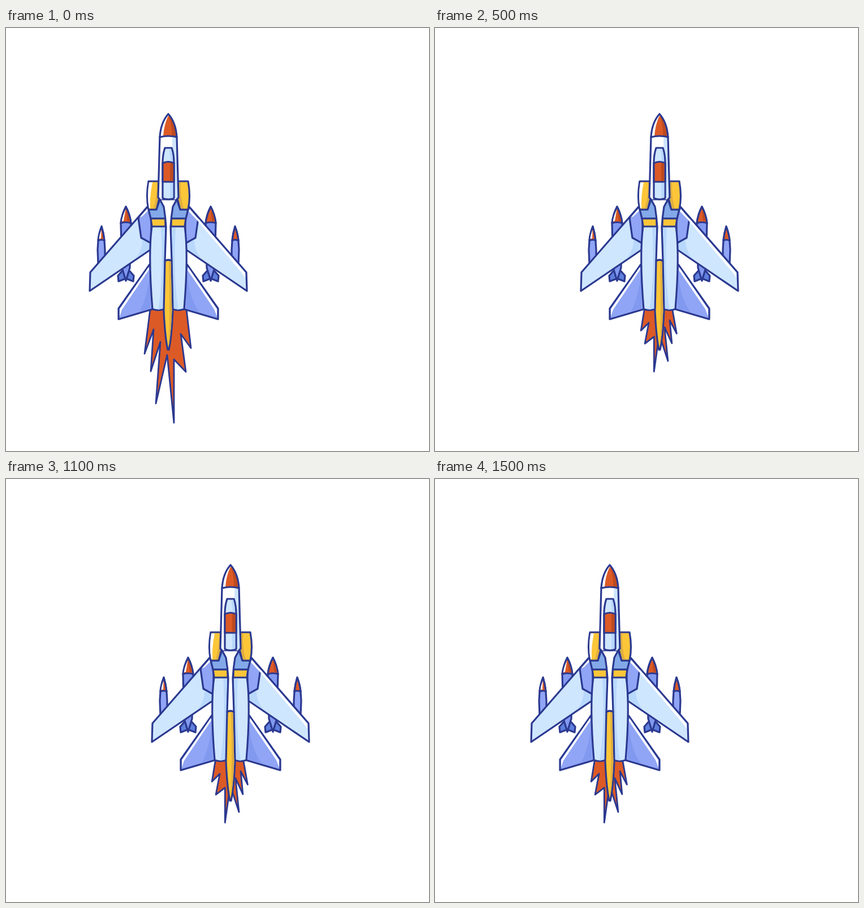
Recreate the animation shown at these times as an HTML page. Size 748 px wide and 748 px high, loop 1.6 s.

```html
<!DOCTYPE html>
<html lang="en">
<head>
<meta charset="utf-8">
<title>Jet</title>
<style>
  html, body { margin: 0; width: 100%; height: 100%; overflow: hidden; background: #fff; }
  svg { display: block; width: 100vw; height: 100vh; }
  .line { stroke: #2b3990; stroke-width: 3.2; stroke-linejoin: round; stroke-linecap: round; }
  .none { fill: none; }
  .white { fill: #fff; }
  .sky { fill: #cfe6ff; }
  .skyDark { fill: #b9d8fd; }
  .steel { fill: #83a9e9; }
  .peri { fill: #90a5f5; }
  .periDark { fill: #8299f0; }
  .navy { fill: #5f7fdc; }
  .red { fill: #dc5a26; }
  .redDark { fill: #bd4a20; }
  .gold { fill: #fdc639; }
  .goldDark { fill: #dfae42; }
  #flame path { vector-effect: non-scaling-stroke; stroke-width: 2.8; }
</style>
</head>
<body>
<svg viewBox="0 0 748 748">
  <defs>
    <g id="missiles" class="line">
      <path class="peri" d="M-118 351Q-123 364-124 376L-125 392-124 418-112 406V392L-113 376Q-114 364-118 351Z"/>
      <path class="red" d="M-118 351Q-123 364-124 376Q-118 373-113 376Q-114 364-118 351Z"/>
      <path class="navy" d="M-82 430L-89 438-88 448-75 443-62 448-61 438-68 430Z"/>
      <path class="periDark" d="M-75 316Q-82 329-84 345L-82 424-75 447-68 424-66 345Q-68 329-75 316Z"/>
      <path class="red" d="M-75 316Q-82 329-84 345Q-75 342-66 345Q-68 329-75 316Z"/>
    </g>
    <g id="wing" class="line">
      <path class="sky" d="M-37 316L-138 432-139 465-30 391V318Z"/>
      <path class="peri" d="M-37 317L-53 336-48 371-30 381V320Z"/>
      <path class="peri" d="M-33 418L-88 496-88 515-27 497V418Z"/>
    </g>
    <g id="hull" class="line">
      <path class="sky" d="M-29 350Q-36 400-28 497Q-18 501-8 497L-4 350Z"/>
      <path class="steel" d="M-35 321H-21L-15 303-6 318-5 337H-31Z"/>
      <path class="gold" d="M-31 337H-5V351H-29Z"/>
      <path class="gold" d="M-35 271H-17V303L-21 321H-35Q-40 298-35 271Z"/>
    </g>
  </defs>

  <g id="jet">
    <use href="#missiles"/>
    <use href="#missiles" transform="scale(-1 1)"/>
    <path class="white" d="M-118.500 357Q-122 366-122.400 373L-119 372ZM-75.500 321Q-81 332-82.200 342L-79 341Z"/>
    <path class="redDark" d="M75.500 321Q81 332 82.200 342L77 341ZM-75 321Q-69 332-67.800 342L-72 341Z"/>

    <g id="flame">
      <path class="line red" d="M-32 0L-42 79-26 36-31 110-14 58-22 167-2 81 10 201 10 89 31 111 22 44 40 69 32 0Z"/>
    </g>

    <use href="#wing"/>
    <use href="#wing" transform="scale(-1 1)"/>
    <path class="skyDark" d="M-46 374L-32 382V390L-58 407Q-46 394-46 374ZM46 374L32 382V390L58 407Q46 394 46 374Z"/>
    <path class="periDark" d="M-32 424V496L-50 501Q-35 470-32 424ZM32 424V496L55 503Q35 475 32 424Z"/>
    <path class="white" d="M-37 319L-51 335-46 333-34 321ZM38 320L50 334 53 337 136 433V442L130 433 51 340 36 324Z"/>
    <path class="white" d="M-35 423L-86 497V510L-82 498-34 427ZM35 423L86 497V510L81 497 34 428Z"/>

    <use href="#hull"/>
    <use href="#hull" transform="scale(-1 1)"/>
    <path class="skyDark" d="M-13 353H-6L-9 496-18 498Q-8 440-13 353ZM13 353H6L9 496 18 498Q8 440 13 353Z"/>
    <path class="white" d="M-34 273H-28Q-33 297-32 318L-34 319Q-38 297-34 273Z"/>
    <path class="goldDark" d="M-20 273H-18V303L-22 319H-26Q-20 300-20 273ZM19 273H22Q21 300 27 319H22L18 303Z"/>

    <path class="line white" d="M-15 303L-8 316Q-5 334-4 352L-6 412H6L4 352Q5 334 8 316L15 303Z"/>
    <path class="line gold" d="M-6 412Q0 408 6 412L8 500Q6 545 1 569H-1Q-6 545-8 500Z"/>
    <path class="goldDark" d="M1 412L4.400 413 6.400 500Q5 540 1 560Q3 480 1 412Z"/>

    <path class="white" d="M-15 192H15L18 303H-18Z"/>
    <path class="sky" d="M7 194H14L17 301H11V240L7 212Z"/>
    <path class="line none" d="M-15 303L-18 300-15 192Q0 188 15 192L18 300 15 303"/>
    <path class="line sky" d="M-6 212H6Q10 224 10 238V301Q0 305-10 301V238Q-10 224-6 212Z"/>
    <path class="skyDark" d="M2 214H5Q8 226 8 236L4 235ZM3 273H8.400V300L3 301Z"/>
    <path class="line red" d="M-10 239Q0 234 10 239V272H-10Z"/>
    <path class="redDark" d="M3 238L8.400 240V270.400H3Z"/>

    <path class="white" d="M0 152C-8 161-14 176-15 193Q0 189 15 193C14 176 8 161 0 152Z"/>
    <path class="red" d="M0 155Q-8 172-9 192Q3 189 15 193C14 176 8 161 0 155Z"/>
    <path class="redDark" d="M1 156Q7 172 6 191L15 193C14 176 8 161 1 156Z"/>
    <path class="line none" d="M0 152C-8 161-14 176-15 193Q0 189 15 193C14 176 8 161 0 152Z"/>
  </g>
</svg>
<script>
  const STEP = 100, STEPS = 16, HALF = STEPS / 2;
  const jet = document.getElementById("jet");
  const flame = document.getElementById("flame");

  function draw() {
    const step = Math.floor(performance.now() / STEP) % STEPS;
    const x = 287 + 22 * (HALF - Math.abs(HALF - step));
    jet.setAttribute("transform", `translate(${x} 0)`);
    // Every other step the flame is short and mirrored.
    flame.setAttribute("transform", step % 2
      ? "translate(-2 497) scale(-.77 .55)"
      : "translate(0 497)");
    requestAnimationFrame(draw);
  }
  draw();
</script>
</body>
</html>
```
